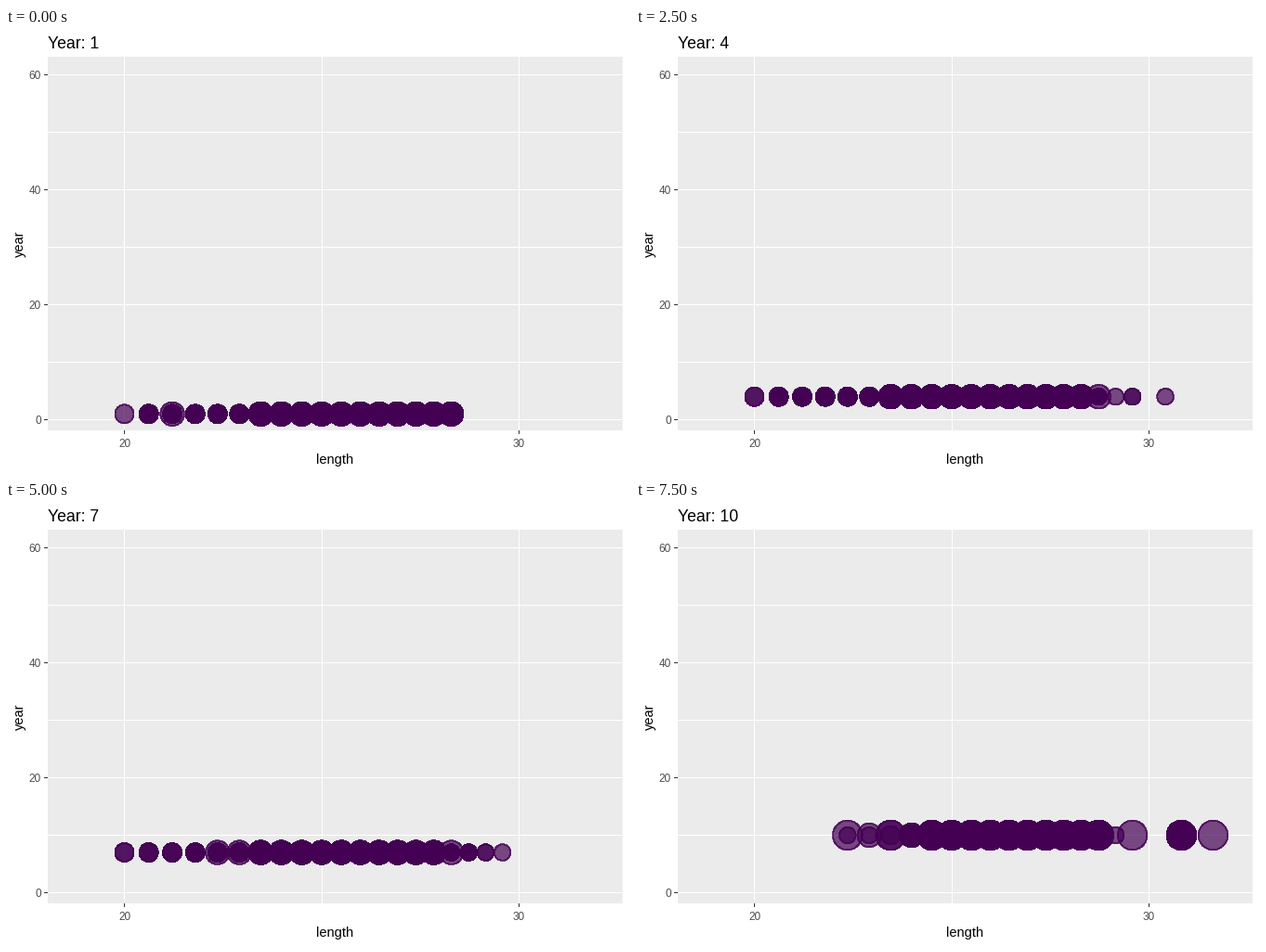
Recreate the animation shown at these times as a matplotlib script. Size 672 by 480 pixels, loop 8000 ms.

```python
import random

import matplotlib.pyplot as plt
import numpy as np
from matplotlib.animation import FuncAnimation
from matplotlib.patches import Rectangle

W, H, DPI = 672, 480, 96
LEFT, RIGHT, TOP, BOTTOM = 45, 664, 31, 434
FRAMES, INTERVAL = 16, 500
STEP = 59 / 99  # years per frame
PURPLE = (68 / 255, 1 / 255, 84 / 255, 0.7)
RADIUS = dict(T=8.8, S=10, M=12.8, X=15.8)

plt.rcParams["font.family"] = "Liberation Sans"

# Per year: (first, core start, core end, last) of the crowded lengths,
# the core's size, and the sparse dots by size.
YEARS = [
    ((1, 6, 16, 16), "M", dict(S=[0], M=[2])),
    ((1, 6, 16, 17), "M", dict(S=[0, 0], M=[22])),
    ((1, 6, 16, 17), "M", dict(S=[0, 0], T=[18], M=[4, 18, 19])),
    ((1, 6, 16, 17), "M", dict(S=[0, 0], M=[17], T=[18, 19, 19, 21])),
    ((1, 7, 15, 17), "M", dict(S=[0] * 3, M=[6, 16], T=[19])),
    ((2, 6, 16, 17), "M", dict(S=[1, 1], M=[18])),
    ((3, 6, 15, 17), "M", dict(S=[0] * 2 + [1, 2] * 3, M=[4, 5, 16], T=[18, 18, 19])),
    ((4, 6, 16, 17), "M", dict(S=[2, 3], T=[18], X=range(8, 16))),
    ((4, 6, 15, 16), "M", dict(S=[1, 2], M=[5, 22], T=[18, 19],
                               X=[*range(7, 15)] * 2 + [15, 16] + [17] * 3)),
    ((8, 8, 17, 17), "X", dict(X=[22] * 4 + [4, 6, 6, 19, 24], M=[5] + [7] * 4,
                               S=[6], T=[4, 5, 18])),
]


def px(length):
    return 127.5 + 42.5 * (length - 20)


def py(year):
    return 422.5 - 6.2 * year


def make_rows(year, spans, core, extras):
    """Rows of (x, y, radius) for one year, in a fixed mixed order."""
    first, lo, hi, last = spans
    body = [(k, "S") for k in range(first, lo)] * 5
    body += [(k, core) for k in range(lo, hi + 1)] * 8
    body += [(k, "T") for k in range(hi + 1, last + 1)] * 4
    random.Random(year).shuffle(body)
    sparse = [(k, size) for size, ks in extras.items() for k in ks]
    rows = sparse + body if year % 2 else body + sparse
    return np.array([(px((400 + 25 * k) ** 0.5), py(year), RADIUS[s]) for k, s in rows])


rows = [make_rows(i + 1, *spec) for i, spec in enumerate(YEARS)]
marks = [round(i / STEP) for i in range(len(YEARS))]


def state(frame):
    """Rows at a frame; unmatched rows show only on their own year."""
    if frame in marks:
        return rows[marks.index(frame)]
    j = max(i for i, m in enumerate(marks) if m < frame)
    a, b = rows[j], rows[j + 1]
    n = min(len(a), len(b))
    f = (frame - marks[j]) / (marks[j + 1] - marks[j])
    return a[:n] + (b[:n] - a[:n]) * f


fig = plt.figure(figsize=(W / DPI, H / DPI), dpi=DPI, facecolor="white")
ax = fig.add_axes([0, 0, 1, 1])
ax.set(xlim=(0, W), ylim=(H, 0))
ax.axis("off")


def box(x, y, w, h, color):
    ax.add_patch(Rectangle((x, y), w, h, fc=color, lw=0, antialiased=False, zorder=1))


box(LEFT, TOP, RIGHT - LEFT, BOTTOM - TOP, "#EBEBEB")
for value in range(0, 61, 10):
    y = int(py(value))
    box(LEFT, y, RIGHT - LEFT, 1, "white")
    if value % 20 == 0:
        box(LEFT - 4, y, 4, 1, "#333333")
        ax.text(38, y + 5, str(value), size=8.8, color="#4D4D4D", ha="right")
for value in (20, 25, 30):
    x = int(px(value))
    box(x, TOP, 1, BOTTOM - TOP, "white")
    if value != 25:
        box(x, BOTTOM, 1, 4, "#333333")
        ax.text(x + 0.5, 452, str(value), size=8.8, color="#4D4D4D", ha="center")

ax.text(354.5, 470, "length", size=11, ha="center")
ax.text(19, 233, "year", size=11, ha="center", va="baseline",
        rotation=90, rotation_mode="anchor")
title = ax.text(45, 22, "", size=13.2)
dots = ax.scatter([], [], color=[PURPLE], linewidths=0.945 * 72 / DPI,
                  antialiased=False, zorder=3)


def update(frame):
    now = state(frame)
    dots.set_offsets(now[:, :2])
    dots.set_sizes((2 * now[:, 2] * 72 / DPI) ** 2)
    title.set_text(f"Year: {round(1 + frame * STEP)}")
    return dots, title


anim = FuncAnimation(fig, update, frames=FRAMES, interval=INTERVAL, repeat=True)
plt.show()
```
